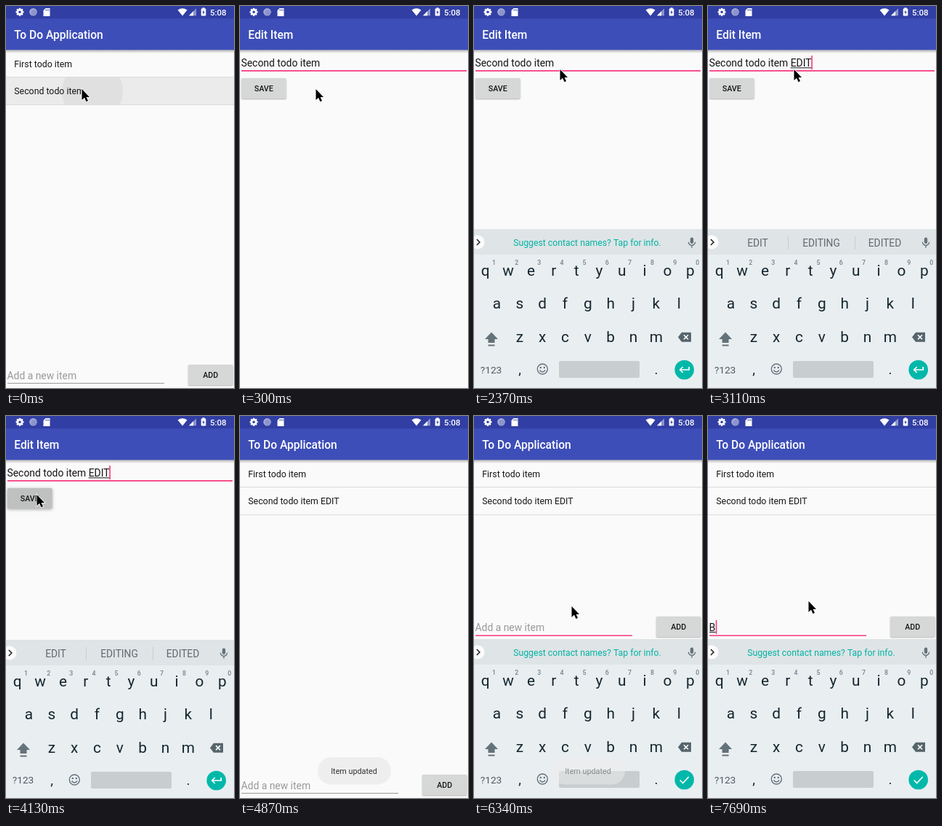
Write an HTML page with a canvas that moves like this. It is 314 by 524 pixels and loops after 7990 ms.

```html
<!DOCTYPE html>
<html lang="en">
<head>
<meta charset="utf-8">
<title>To Do Application</title>
<style>
  html, body { margin: 0; width: 100%; height: 100%; overflow: hidden; background: #fafafa; }
  canvas { display: block; width: 314px; height: 524px; }
</style>
</head>
<body>
<canvas id="stage"></canvas>
<script>
const W = 314, H = 524, LOOP = 7990, BEAT = 147.5;
const PINK = '#f8387f', TEAL = '#00b8a9', INK = '#161616', KEY = '#14262e', DIM = '#64727a';
const canvas = document.getElementById('stage'), g = canvas.getContext('2d');
const dpr = window.devicePixelRatio || 1;
canvas.width = W * dpr;
canvas.height = H * dpr;
g.scale(dpr, dpr);

// All moments below are counted in beats, the pace at which the picture changes.
const CLICK = 7, SPACE = 12, WORD = 17, SAVE = 27, CLOSE = 29, FOCUS = 39, RAISED = 41, ENTRY = 52;

// Pointer stops: beat, x, y.
const stops = [
  [3, 104, 114], [6, 111, 80], [8, 111, 80], [10, 118, 87], [22, 118, 87],
  [SAVE, 42, 108], [30, 42, 108], [34, 122, 507], [FOCUS, 122, 507], [43, 134, 261], [44, 138, 254]
];

const ramp = (from, to, n) => Math.min(1, Math.max(0, (n - from) / (to - from)));
const smooth = p => p * p * (3 - 2 * p);

function pointer(n) {
  let [start, x, y] = stops[0];
  for (const [beat, nx, ny] of stops) {
    const p = smooth(ramp(start, beat, n));
    if (beat > start) { x += (nx - x) * p; y += (ny - y) * p; }
    start = beat;
  }
  return [x, y];
}

// The caret restarts its blinking at every click or key.
function caretOn(n) {
  const last = [4, CLICK, SPACE, WORD, WORD + 4, FOCUS].findLast(k => k <= n);
  return Math.floor((n - last) / 3.2) % 2 === 0;
}

const typedWord = n => n < WORD ? '' : 'EDIT'.slice(0, Math.max(1, n - WORD + 1 - 1 + (n > WORD + 1 ? 0 : 0)));

function rect(x, y, w, h, color, r = 0) {
  g.fillStyle = color;
  g.beginPath();
  g.roundRect(x, y, w, h, r);
  g.fill();
}

function circle(x, y, r, color) {
  g.fillStyle = color;
  g.beginPath();
  g.arc(x, y, r, 0, 7);
  g.fill();
}

function shape(d, x, y, fill, stroke, width = 1) {
  const path = new Path2D(d);
  g.save();
  g.translate(x, y);
  if (stroke) { g.strokeStyle = stroke; g.lineWidth = width; g.stroke(path); }
  if (fill) { g.fillStyle = fill; g.fill(path); }
  g.restore();
}

function text(s, x, y, size, color = INK, align = 'left', weight = 400) {
  g.font = `${weight} ${size}px Roboto, sans-serif`;
  g.fillStyle = color;
  g.textAlign = align;
  g.fillText(s, x, y);
  return g.measureText(s).width;
}

function group(alpha, dy, draw) {
  g.save();
  g.globalAlpha *= alpha;
  g.translate(0, dy);
  draw();
  g.restore();
}

function button(label, x, y, w, pressed) {
  g.save();
  g.shadowColor = `rgba(0,0,0,${pressed ? 0.35 : 0.28})`;
  g.shadowBlur = (pressed ? 4 : 2) * dpr;
  g.shadowOffsetY = dpr;
  rect(x, y, w, 28, pressed ? '#bfc0c0' : '#d6d7d7', 1.5);
  g.restore();
  text(label, x + w / 2, y + 18.2, 10.7, INK, 'center', 500);
}

function page(title) {
  rect(0, 17, W, H, '#fafafa');
  const shade = g.createLinearGradient(0, 60, 0, 65);
  shade.addColorStop(0, 'rgba(0,0,0,.28)');
  shade.addColorStop(1, 'rgba(0,0,0,0)');
  rect(0, 60, W, 5, shade);
  rect(0, 17, W, 43.3, '#3e4eb8');
  text(title, 11.3, 45, 15.6, '#fff', 'left', 500);
}

function statusBar() {
  rect(0, 0, W, 17.3, '#313ea3');
  for (let i = 0; i < 8; i++) {
    g.save();
    g.translate(19, 8.3);
    g.rotate(i * Math.PI / 4);
    rect(-1.2, -5.5, 2.4, 3, '#fff');
    g.restore();
  }
  circle(19, 8.3, 4.2, '#fff');
  circle(19, 8.3, 1.7, '#313ea3');
  circle(37.5, 8.3, 5.3, '#a5abd8');
  circle(38.2, 9, 3.9, '#8c94cb');
  shape('M3 0H9V11H0V3Z', 51.5, 3, '#fff');
  for (let x = 54.5; x < 59; x += 2) rect(x, 4.5, 1, 2, '#313ea3');
  shape('M-6.5 -3Q0 -7.5 6.5 -3L0 5Z', 243, 8.5, '#fff');
  shape('M10 0V10H0Z', 252, 3.3, '#8c94cb');
  shape('M6 4V10H0Z', 252, 3.3, '#fff');
  rect(268.7, 3.5, 6.6, 10, '#fff', 1);
  rect(270.5, 2.3, 3, 2, '#fff');
  shape('M.6 -3L-1.8 .6H-.2L-.6 3.4L1.8 -.6H.2Z', 272, 8.5, '#313ea3');
  text('5:08', 281, 12.7, 11.5, '#fff', 'left', 500);
}

function listPage(n) {
  page('To Do Application');
  if (n < 2) {
    rect(0, 97, W, 38, '#ebebeb');
    g.save();
    g.beginPath();
    g.rect(0, 97, W, 38);
    g.clip();
    circle(119, 117, 42, '#e0e0e0');
    g.restore();
  }
  const items = ['First todo item', 'Second todo item' + (n >= CLOSE ? ' EDIT' : '')];
  items.forEach((item, i) => {
    rect(0, 97 + i * 38, W, 1, '#dcdcdc');
    text(item, 11.3, 83.7 + i * 37.7, 12.33);
  });

  const focused = n >= FOCUS;
  group(1, n >= RAISED ? -217 : 0, () => {
    let x = 2;
    if (n >= ENTRY) {
      x += text('B', 1.5, 512, 13.9);
      rect(2, 513, x - 2, 1, INK);
    } else {
      text('Add a new item', 1.5, 512, 13.9, '#999');
    }
    if (focused) rect(2, 517.5, 216, 1.6, PINK);
    else rect(2, 517, 216, 1, '#9a9a9a');
    if (focused && caretOn(n)) rect(x, 497, 1.6, 19, PINK);
    button('ADD', 251, 492, 61.5);
  });
}

function editPage(n) {
  page('Edit Item');
  const clicked = n >= CLICK, word = typedWord(n);
  const before = n < WORD ? 'Second todo ' : 'Second todo item ';
  const line = n < WORD ? before + (n < SPACE ? 'item' : 'item ') : before + word;
  const width = text(line, 1.5, 83, 13.9);
  const start = g.measureText(before).width;
  if (clicked && !line.endsWith(' ')) rect(1.5 + start, 84.3, width - start, 1, INK);
  rect(2, 88, 310, 1.7, PINK);
  button('SAVE', 2, 99, 61.5, n >= SAVE);
  if (n >= 4 && caretOn(n)) rect(clicked ? 1.2 + width : 2, 68, 1.6, 19, PINK);
  if (clicked && n < SPACE) shape('M0 -9L5.5 -5.5A7.8 7.8 0 1 1 -5.5 -5.5Z', 110.7, 97.3, '#ff6ba0');
}

function suggestions(n) {
  if (n < WORD - 1) return ['item', 'items', 'Item'];
  if (n >= WORD && n < FOCUS) return [typedWord(n), 'EDITING', 'EDITED'];
}

function keys(n) {
  rect(0, 306, W, 240, '#e9eef1');
  rect(0, 306, W, 35, '#dfe4e6');
  circle(5, 324, 9.5, '#fcfcfc');
  shape('M-2.2 -4L1.8 0L-2.2 4', 6, 324, null, '#222', 1.6);
  rect(297.8, 317.5, 4.4, 8.5, DIM, 2.2);
  shape('M-4.6 0A4.6 4.6 0 0 0 4.6 0M0 4.5V8', 300, 323.7, null, DIM, 1.3);

  const offer = suggestions(n);
  if (offer) {
    offer.forEach((word, i) => text(word, 68.5 + i * 87.5, 330, 13.75, '#5f6b70', 'center'));
    rect(110, 316, 1, 18, '#c8ced1');
    rect(202, 316, 1, 18, '#c8ced1');
  } else {
    text('Suggest contact names? Tap for info.', 156, 328.7, 12.25, '#00b3a4', 'center');
  }

  ['qwertyuiop', 'asdfghjkl', 'zxcvbnm'].forEach((row, r) => {
    const left = 15.7 * 2 ** r;
    [...row].forEach((c, i) => text(c, left + i * 31.35, 370 + r * 45.4, 20.8, KEY, 'center'));
  });
  for (let i = 0; i < 10; i++) text((i + 1) % 10, 27.5 + i * 31.15, 355, 8.8, '#75828a', 'center', 500);

  shape('M0 -8.5L9 1H4.5V6H-4.5V1H-9Z', 24, 456, DIM);
  rect(19.5, 464.5, 9, 2, DIM);
  shape('M0 6.5L5 0H18V13H5Z', 281, 447.7, '#56656d');
  shape('M-3 -3L3 3M3 -3L-3 3', 292, 454.2, null, '#fff', 1.6);

  text('?123', 23.5, 503.5, 13.7, '#4d5b62', 'center');
  text(',', 63, 505, 19, KEY, 'center');
  text('.', 251, 505, 19, KEY, 'center');
  shape('M7 0A7 7 0 1 1 -7 0A7 7 0 1 1 7 0M-3.8 1.5Q0 6.5 3.8 1.5', 94.3, 498, null, DIM, 1.4);
  circle(91.8, 496, 1.2, DIM);
  circle(96.8, 496, 1.2, DIM);
  rect(117, 487, 111, 23, '#c8cdd0', 2);
  circle(289.7, 499, 13.3, TEAL);
  const mark = n >= FOCUS ? 'M-6 .5L-2 4.5L6 -4' : 'M6.5 -4V0H-6M-2 -4L-6 0L-2 4';
  shape(mark, 289.7, 499, null, '#fff', 1.7);
}

function toast() {
  rect(107, 468, 101, 37.5, '#eee', 18.5);
  text('Item updated', 157, 490.8, 10.8, '#333', 'center');
}

function draw(n) {
  listPage(n);
  const edit = ramp(0, 2, n) - ramp(28, 30, n);
  if (edit) group(edit, (1 - edit) * 40, () => editPage(n));

  // The keyboard slides in evenly and speeds up on its way out.
  const open = ramp(8, 10, n) - ramp(SAVE, 30, n) ** 5 + ramp(FOCUS, RAISED, n);
  if (open) group(1, (1 - open) * 240, () => keys(n));
  statusBar();

  const fade = ramp(CLOSE, 33, n) - ramp(42, 44, n);
  if (fade) group(fade, 0, toast);
  if (n < 31 || n >= 35) {
    shape('M.5 0V15L4 11.8L6.5 17.2L9 16L6.6 10.9H11Z', ...pointer(n), '#000', '#fff', 1.6);
  }
}

function tick(now) {
  draw(Math.floor((now % LOOP + 10) / BEAT));
  requestAnimationFrame(tick);
}
requestAnimationFrame(tick);
</script>
</body>
</html>
```
